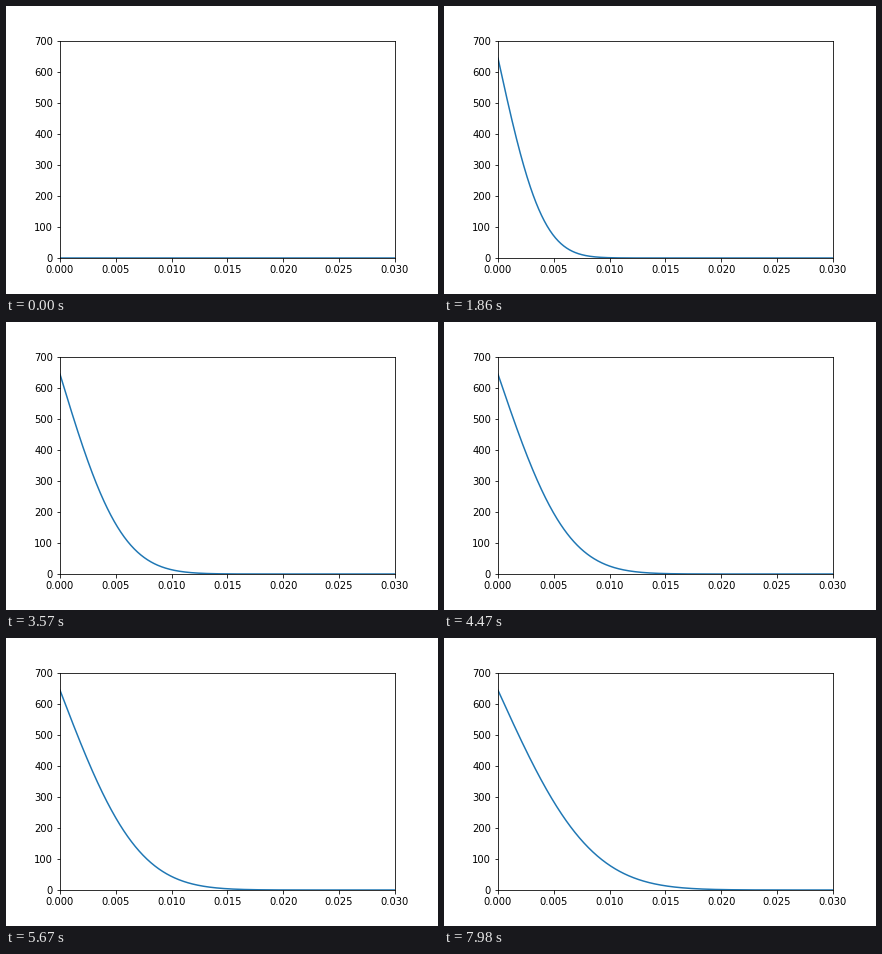
A matplotlib script that plays this animation: 432 px wide and 288 px high, repeating every 8000 ms.

```python
import math

import numpy as np
import matplotlib.pyplot as plt
from matplotlib.animation import FuncAnimation

LOOP = 8000          # ms
INTERVAL = 20        # ms between drawn frames
STEP = 30            # ms per simulation step
SURFACE = 643.0      # fixed value at x = 0
SPREAD = 3.17e-7     # 4 * D * dt for one step
LENGTH = 0.03

erfc = np.vectorize(math.erfc)
x = np.linspace(0, LENGTH, 601)


def profile(n):
    """Diffusion into a half-space after n steps."""
    if n == 0:
        return np.zeros_like(x)
    return SURFACE * erfc(x / math.sqrt(SPREAD * n))


fig, ax = plt.subplots(figsize=(6, 4), dpi=72)
fig.subplots_adjust(left=0.125, right=0.9, bottom=0.125, top=0.88)
ax.set_xlim(0, LENGTH)
ax.set_ylim(0, 700)
line, = ax.plot(x, profile(0), color="#1f77b4", lw=1.5)


def update(i):
    n = (i * INTERVAL + STEP - INTERVAL) // STEP
    line.set_ydata(profile(n))
    return line,


def reset():
    return update(0)


anim = FuncAnimation(fig, update, frames=LOOP // INTERVAL, init_func=reset,
                     interval=INTERVAL, repeat=True, repeat_delay=0, blit=False)
plt.show()
```
